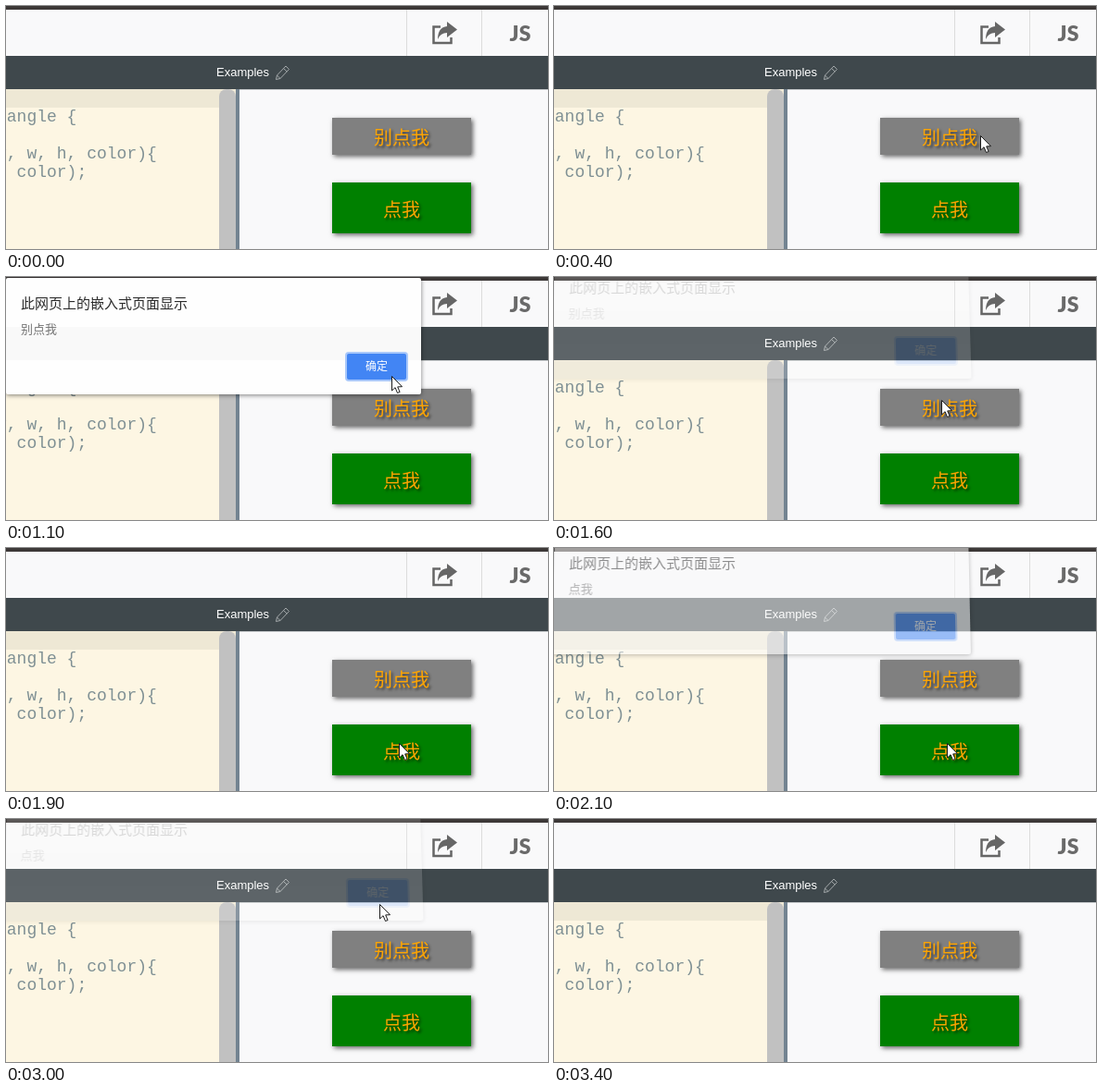
Write an HTML page with a canvas that moves like this. It is 585 px wide and 263 px high and loops after 4500 ms.

```html
<!DOCTYPE html>
<html lang="zh">
<head>
<meta charset="utf-8">
<style>
  html, body { margin: 0; width: 100%; height: 100%; overflow: hidden; background: #f9f9fa; }
  canvas { display: block; }
</style>
</head>
<body>
<canvas id="stage" width="585" height="263"></canvas>
<script>
const W = 585, H = 263, LOOP = 4500, STEP = 100;
const CJK = '"Noto Sans CJK SC", "Noto Sans CJK", "Microsoft YaHei", sans-serif';
const SANS = '"Liberation Sans", Arial, sans-serif';
const MONO = '"Courier New", "Liberation Mono", monospace';
const view = document.getElementById('stage').getContext('2d');

function layer(w, h, paint) {
  const c = document.createElement('canvas');
  c.width = w;
  c.height = h;
  paint(c.getContext('2d'));
  return c;
}

function rect(g, color, x, y, w, h, radius = 0) {
  g.fillStyle = color;
  g.beginPath();
  g.roundRect(x, y, w, h, radius);
  g.fill();
}

function text(g, str, x, y, font, color, align = 'left') {
  g.font = font;
  g.fillStyle = color;
  g.textAlign = align;
  g.fillText(str, x, y);
}

function shadow(g, alpha, dx, dy, blur) {
  g.shadowColor = `rgba(0,0,0,${alpha})`;
  g.shadowOffsetX = dx;
  g.shadowOffsetY = dy;
  g.shadowBlur = blur;
}

function shareIcon(g) {
  g.strokeStyle = g.fillStyle = '#666';
  g.lineWidth = 2.5;
  g.stroke(new Path2D('M469 22.5H461.5V40H480.5V34'));
  g.fill(new Path2D('M466 36Q466 23 476 22V17L487 25.5L476 34V29Q469 29 466 36Z'));
}

function pencil(g) {
  g.strokeStyle = '#a3a8aa';
  g.lineWidth = 1;
  g.stroke(new Path2D('M291.5 79.5l1-4.5l9.5-10l3.5 3.5l-9.5 10zM299.5 67.5l3.8 3.5M292.5 75l3.5 3.5'));
}

function button(g, label, color, y, h) {
  g.save();
  shadow(g, 0.6, 2, 2, 5);
  rect(g, color, 352, y, 150, h);
  shadow(g, 0.6, 2, 2, 3);
  text(g, label, 427, Math.round(y + h / 2 + 9), '20px ' + CJK, '#ffa500', 'center');
  g.restore();
}

const page = layer(W, H, g => {
  rect(g, '#f9f9fa', 0, 0, W, H);
  rect(g, '#3d3938', 0, 0, W, 4);
  rect(g, '#dcdcdc', 432, 4, 1, 50);
  rect(g, '#dcdcdc', 513, 4, 1, 50);
  shareIcon(g);
  text(g, 'JS', 555, 38, '900 23px Lato, sans-serif', '#6a6a6a', 'center');

  rect(g, '#3f484c', 0, 54, W, 36);
  rect(g, '#c9cccd', 252, 90, W, 1);
  text(g, 'Examples', 227, 76, '13px ' + SANS, '#fff');
  pencil(g);

  rect(g, '#fdf6e3', 0, 90, 248, 173);
  rect(g, '#eee8d5', 0, 90, 248, 20);
  rect(g, '#c1c1c1', 230, 90, 18, 190, 8);
  rect(g, '#738391', 248, 90, 4, 173);

  ['tangle {', '', 'y, w, h, color){', '  color);'].forEach((line, i) =>
    text(g, line, -10, 125 + 20 * i, '18px ' + MONO, '#7f9094'));

  button(g, '别点我', '#808080', 121, 40);
  button(g, '点我', '#008000', 191, 55);
});

// Dialog layers have a small margin on the left and right for the shadow.
const PAD = 8, DW = 464, DH = 140;

function makeDialog(message, fill) {
  return layer(DW, DH, g => {
    g.translate(PAD, 0);
    g.save();
    shadow(g, 0.5, 0, 1, 5);
    rect(g, fill, 0, 1, 448, 126, 2);
    g.restore();
    rect(g, '#f9f9f9', 0, 54, 448, 36);
    text(g, '此网页上的嵌入式页面显示', 16, 34, '15px ' + CJK, '#2b2b2b');
    text(g, message, 16, 61, '13px ' + CJK, '#757575');
    rect(g, '#a9c8fa', 366, 81, 68, 32, 4);
    rect(g, '#4285f4', 368, 83, 64, 28, 2);
    text(g, '确定', 400, 101, '12px ' + CJK, '#fff', 'center');
  });
}

const first = makeDialog('别点我', '#fefefe');
const second = makeDialog('点我', '#fafafa');

// A fading dialog slides upwards and tips slightly, so its foot looks wider.
function drawDialog(img, alpha) {
  const gone = 1 - alpha;
  const dy = -Math.round(18 * gone ** 0.5);
  view.globalAlpha = alpha;
  for (let y = 0; y < DH; y++) {
    const k = 1 + 0.018 * Math.sqrt(gone) * (y - 40) / 127;
    view.drawImage(img, 0, y, DW, 1, 224 - DW / 2 * k, y + dy, DW * k, 1);
  }
  view.globalAlpha = 1;
}

const arrow = new Path2D('M0 0V15.5L3.6 12.2L6 18L8.6 17L6.2 11.4L11 11.2Z');

function drawCursor([x, y]) {
  view.save();
  view.translate(Math.round(x) + 0.5, Math.round(y) + 0.5);
  view.fillStyle = '#fff';
  view.strokeStyle = '#1c1c1c';
  view.lineWidth = 1;
  view.fill(arrow);
  view.stroke(arrow);
  view.restore();
}

const clamp = v => Math.min(1, Math.max(0, v));
const easeOut = p => 1 - (1 - p) ** 3;

const FADE = 190;
const fade = (t, opens, closes) => clamp((t - opens) / FADE) * clamp(1 - (t - closes) / FADE);

const ENTRY = [852, -150], LEAVES = 3300;
const moves = [
  { at: 100, ms: 300, to: [460, 140] },
  { at: 1000, ms: 300, to: [398, 93] },
  { at: 1400, ms: 200, to: [418, 133] },
  { at: 1600, ms: 300, to: [424, 211] },
  { at: 2400, ms: 400, to: [403, 92] },
  { at: 3000, ms: 300, to: [540, 92] }
];

function cursorAt(t) {
  return moves.reduce((pos, { at, ms, to }) => {
    const p = easeOut(clamp((t - at) / ms));
    return pos.map((v, i) => v + (to[i] - v) * p);
  }, ENTRY);
}

function draw(ms) {
  const t = Math.floor((ms % LOOP) / STEP) * STEP;
  view.drawImage(page, 0, 0);
  drawDialog(first, fade(t, 500, 1440));
  drawDialog(second, fade(t, 2000, 2840));
  if (t <= LEAVES) drawCursor(cursorAt(t));
}

const start = performance.now();
function tick() {
  draw(performance.now() - start);
  requestAnimationFrame(tick);
}
tick();
</script>
</body>
</html>
```
